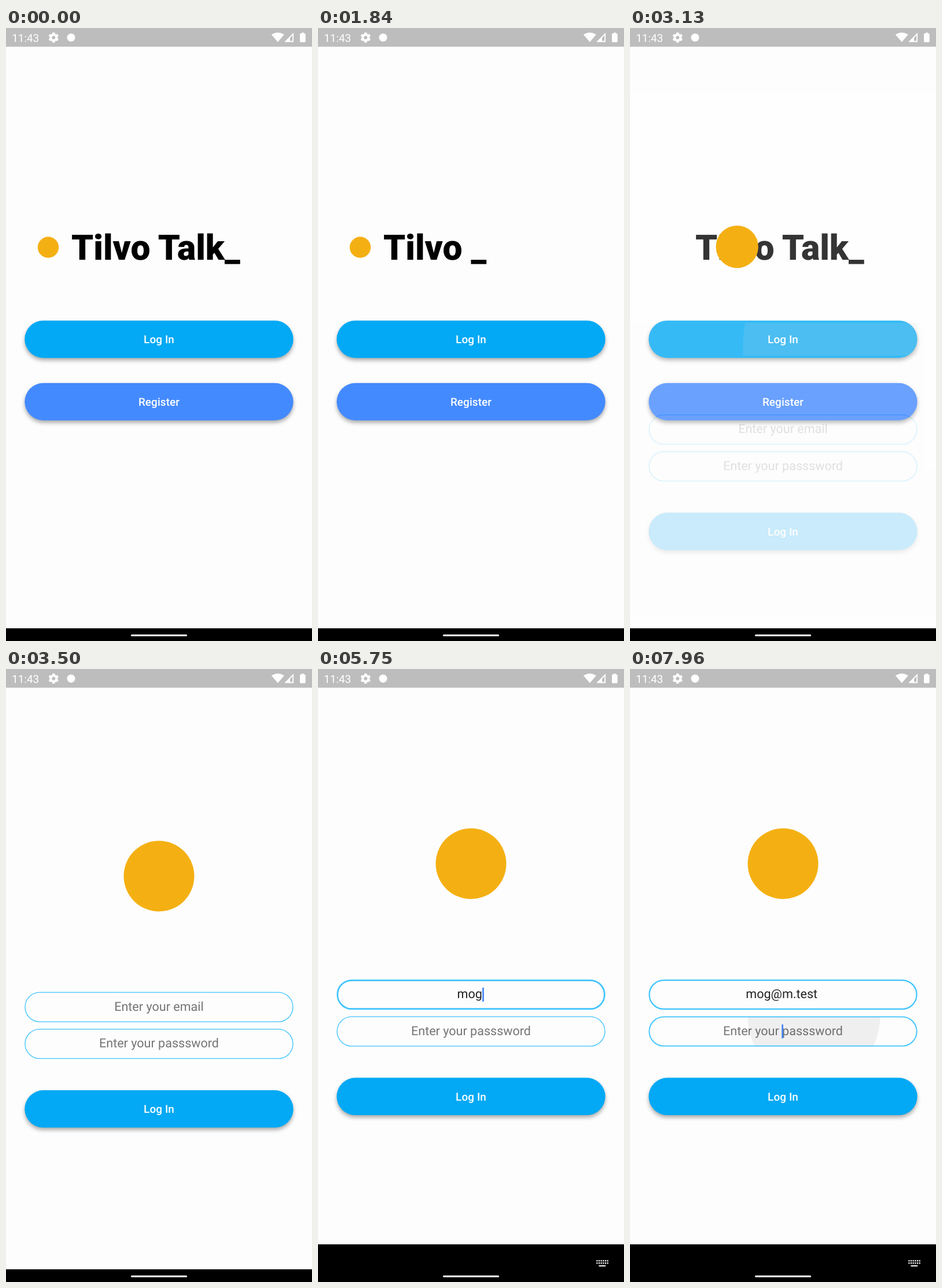
Write an HTML page that moves like this. It is 529 by 1058 pixels and loops after 8 s.

```html
<!DOCTYPE html>
<html lang="en">
<head>
<meta charset="utf-8">
<title>Login</title>
<style>
html, body { margin: 0; width: 100%; height: 100%; overflow: hidden; background: #fdfdfd; }
svg { display: block; width: 100%; height: 100%; }
text { font-family: Roboto, sans-serif; text-rendering: geometricPrecision; white-space: pre; }
.mid { text-anchor: middle; }
.label { font-size: 18.9px; font-weight: 500; fill: #fff; letter-spacing: .1px; }
.field { font-size: 21.55px; }
.title { font-size: 60.6px; font-weight: 900; }
</style>
</head>
<body>
<svg id="stage" viewBox="0 0 529 1058" xmlns="http://www.w3.org/2000/svg">
  <defs>
    <filter id="blur" x="-10%" y="-40%" width="120%" height="180%"><feGaussianBlur stdDeviation="3.6"/></filter>
    <clipPath id="clipButton"><rect x="32.3" y="508.9" width="464.4" height="56.6" rx="2.7"/></clipPath>
    <clipPath id="clipEmail"><rect x="32.3" y="557.5" width="464.4" height="52" rx="26"/></clipPath>
    <clipPath id="clipPass"><rect x="32.3" y="621" width="464.4" height="52" rx="26"/></clipPath>
  </defs>
  <rect width="529" height="1058" fill="#fdfdfd"/>
  <g id="welcome"><text id="title" class="title" x="113" y="400"></text></g>
  <g id="login"><rect width="529" height="1058" fill="#fdfdfd"/></g>
  <circle id="hero" fill="#f4b013"/>

  <rect width="529" height="32.3" fill="#bdbdbd"/>
  <g fill="#fff">
    <text x="10.2" y="23.6" font-size="18.9">11:43</text>
    <g id="gear" transform="translate(82.3 16.5)"></g>
    <circle cx="112.5" cy="16.5" r="7"/>
    <path d="M469.9 24.3 458.8 11.3Q469.9 4.3 481 11.3Z"/>
    <path d="M483.5 23.3H496.2V10.4Z" fill="none" stroke="#fff" stroke-width="1.9"/>
    <path d="M483 24 491 16V24Z"/>
    <rect x="508" y="9.6" width="9.8" height="14.8" rx="1.3"/>
    <rect x="510.7" y="8" width="4.4" height="3"/>
  </g>

  <rect id="panel" width="529" height="66"/>
  <g id="keys" fill="none" stroke="#fff" stroke-width="2.3">
    <path d="M481.3 1021.3H502M481.3 1025.3H502" stroke-dasharray="2.3 1.35"/>
    <path d="M485.5 1030.2H497.3" stroke-width="2"/>
  </g>
  <rect y="1036.3" width="529" height="22"/>
  <rect x="216" y="1046.7" width="97" height="3" rx="1.5" fill="#fff"/>
</svg>
<script>
const NS = 'http://www.w3.org/2000/svg';
const $ = id => document.getElementById(id);
const LEFT = 32.3, WIDE = 464.4, MID = 264.5, TYPED_MID = 262.2;
const NAME = 'Tilvo Talk', MAIL = 'mog@m.test';
const KEYS = [5340, 5540, 5740, 6020, 6250, 6440, 6610, 6770, 7000, 7150];
const FOCUS = 4520, NEXT = 7900, ROUTE = 3015;

function add(parent, tag, attrs, text) {
  const el = document.createElementNS(NS, tag);
  set(el, attrs);
  if (text) el.textContent = text;
  return parent.appendChild(el);
}
function set(el, attrs) {
  for (const k in attrs) el.setAttribute(k, attrs[k]);
}

function button(parent, y, fill, label) {
  const box = { x: LEFT, y, width: WIDE, height: 64.6, rx: 32.3 };
  add(parent, 'rect', { ...box, y: y + 4, filter: 'url(#blur)', opacity: .33 });
  add(parent, 'rect', { ...box, fill });
  const ink = add(parent, 'g', {});
  add(parent, 'text', { x: MID, y: y + 39, class: 'label mid' }, label);
  return ink;
}

function field(y, hint, clip) {
  const g = add($('login'), 'g', {});
  const ink = splash(g, clip);
  return {
    y, ink,
    border: add(g, 'rect', { fill: 'none', stroke: '#40c4ff' }),
    hint: add(g, 'text', { x: MID, y: y + 32.4, class: 'field mid', fill: '#000', 'fill-opacity': .54 }, hint),
    typed: add(g, 'text', { x: TYPED_MID, y: y + 32.4, class: 'field mid', fill: '#000', 'fill-opacity': .87 }),
    caret: add(g, 'rect', { y: y + 14, width: 2.7, height: 24, fill: '#4285f4' })
  };
}

function splash(parent, clip) {
  const g = add(parent, 'g', { 'clip-path': `url(#${clip})` });
  return add(g, 'circle', { fill: '#c8c8c8' });
}

const clamp = v => Math.min(1, Math.max(0, v));
const ramp = (t, start, time) => clamp((t - start) / time);
const mix = (a, b, p) => a + (b - a) * p;

function bezier(x1, y1, x2, y2) {
  const at = (a, b, s) => 3 * a * s * (1 - s) ** 2 + 3 * b * s * s * (1 - s) + s ** 3;
  return x => {
    let lo = 0, hi = 1;
    for (let i = 0; i < 24; i++) {
      const s = (lo + hi) / 2;
      if (at(x1, x2, s) < x) lo = s; else hi = s;
    }
    return at(y1, y2, hi);
  };
}
const fastOut = bezier(.4, 0, .2, 1);
const easeIn = bezier(.42, 0, 1, 1);

function drawSplash(el, t, start, x, y) {
  const dt = t - start;
  const opacity = dt < 0 ? 0 : .28 * clamp(dt / 75) * clamp((330 - dt) / 200);
  set(el, { cx: x, cy: y, r: Math.max(0, 40 + .8 * dt), opacity });
}

function drawField(f, t, focus, focused, since, text) {
  const w = 1.35 * (1 + focus);
  set(f.border, {
    x: LEFT + w / 2, y: f.y + w / 2, width: WIDE - w, height: 52 - w,
    rx: 26 - w / 2, 'stroke-width': w
  });
  f.typed.textContent = text;
  f.hint.style.display = text ? 'none' : '';
  const end = text ? TYPED_MID + f.typed.getComputedTextLength() / 2 + .3 : 262.2;
  const on = focused && (t - since) % 1000 < 500;
  set(f.caret, { x: end, opacity: on ? 1 : 0 });
}

function titleAt(t) {
  if (t < 250) return NAME;
  return NAME.slice(0, Math.max(0, Math.floor(t / 250) - 1));
}

const welcomeInk = button($('welcome'), 504.9, '#03a9f4', 'Log In');
const tapInk = splash(welcomeInk, 'clipButton');
button($('welcome'), 612.7, '#448aff', 'Register');
const email = field(557.5, 'Enter your email', 'clipEmail');
const pass = field(621, 'Enter your passsword', 'clipPass');
button($('login'), 727, '#03a9f4', 'Log In');

add($('gear'), 'circle', { r: 5, fill: 'none', stroke: '#fff', 'stroke-width': 4 });
for (let a = 0; a < 360; a += 60)
  add($('gear'), 'rect', { x: -2.2, y: -8.8, width: 4.4, height: 4, rx: .6, transform: `rotate(${a})` });

function draw(t) {
  $('title').textContent = titleAt(t) + '_';
  drawSplash(tapInk, t, 2900, 420, 550);

  const p = ramp(t, ROUTE, 300), e = fastOut(p);
  const lift = t >= 4600 ? -21.5 : 0;
  $('welcome').style.display = p < 1 ? '' : 'none';
  $('login').style.display = p > 0 ? '' : 'none';
  set($('login'), { opacity: easeIn(p), transform: `translate(0 ${264.5 * (1 - e) + lift})` });
  set($('hero'), {
    cx: mix(73, MID, e),
    cy: mix(378.5, 357.5, e ** 6) + lift,
    r: mix(18.2, 61, e ** 1.57)
  });

  const typed = KEYS.filter(k => k <= t).length;
  const lastKey = typed ? KEYS[typed - 1] : FOCUS;
  const toPass = ramp(t, NEXT, 167);
  drawSplash(email.ink, t, 4470, 290, 580);
  drawSplash(pass.ink, t, 7868, 318, 621.5);
  drawField(email, t, ramp(t, FOCUS, 167) - toPass, t >= FOCUS && t < NEXT, lastKey, MAIL.slice(0, typed));
  drawField(pass, t, toPass, t >= NEXT, NEXT, '');

  const up = 1 - (1 - ramp(t, 4560, 320)) ** 2;
  set($('panel'), { y: mix(1036.3, 993, up) });
  set($('keys'), { opacity: clamp(up * 1.6 - .4) });
}

function tick() {
  draw(performance.now() % 8000);
  requestAnimationFrame(tick);
}
tick();
</script>
</body>
</html>
```
